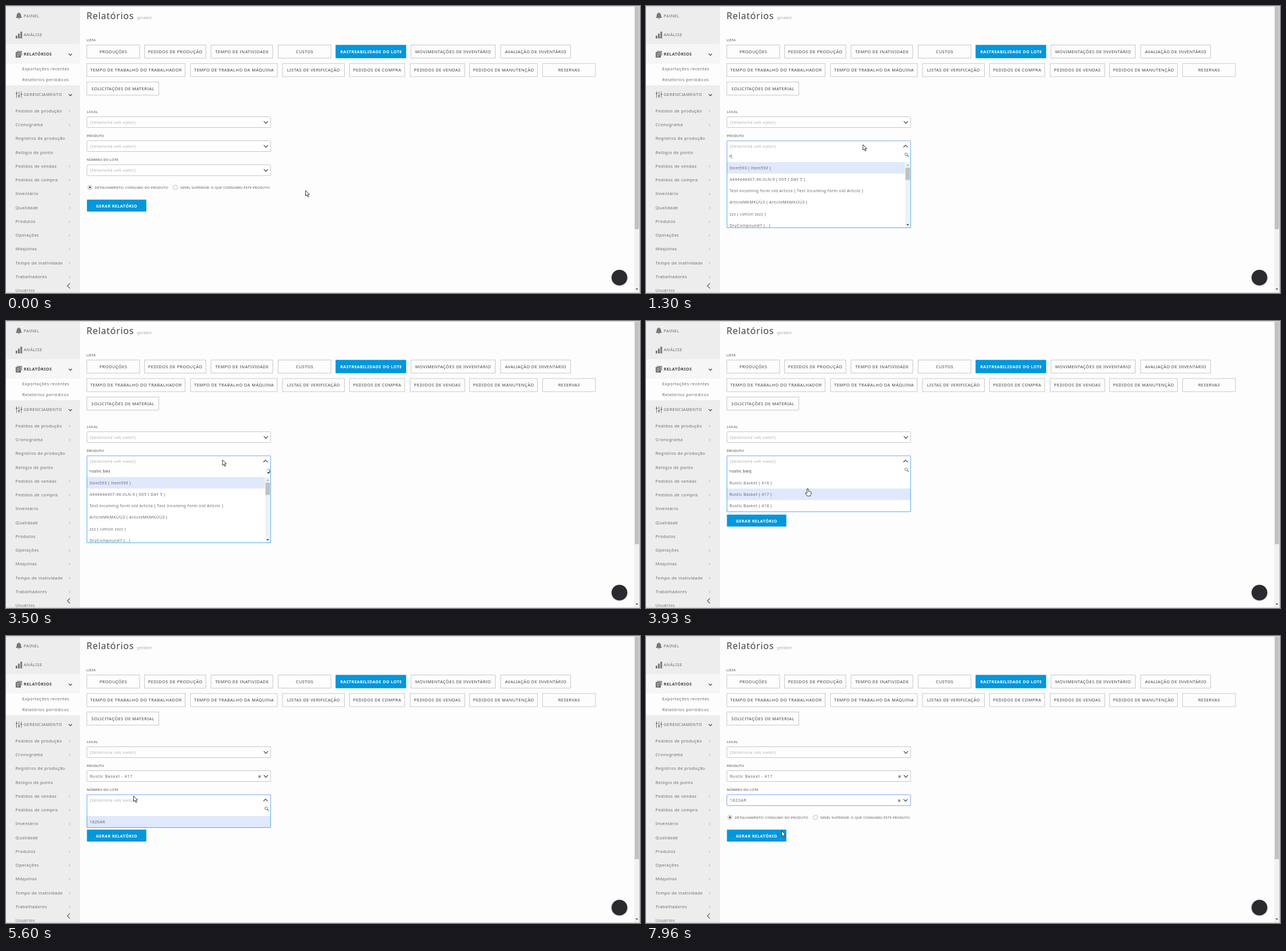
Animation of 1110 by 504 pixels, one loop 8 s. Source, as an HTML page:

```html
<!DOCTYPE html>
<html lang="pt">
<head>
<meta charset="utf-8">
<title>Relatórios</title>
<style>
html, body { margin: 0; width: 100%; height: 100%; overflow: hidden; background: #fdfdfd; }
svg { display: block; width: 100vw; height: 100vh; }
text { font-family: "Noto Sans", sans-serif; white-space: pre; }
.nav { font-size: 7.3px; letter-spacing: .46px; fill: #6a6a6a; }
.strong { font-weight: 700; fill: #444; }
.title { font-size: 16px; letter-spacing: .75px; fill: #444; }
.sub { font-size: 6.9px; letter-spacing: .15px; fill: #a8a8a8; }
.label { font-size: 6.1px; letter-spacing: .13px; fill: #444; }
.radio { font-size: 6.1px; letter-spacing: .14px; fill: #555; }
.button { font-size: 7.4px; letter-spacing: .5px; fill: #404040; text-anchor: middle; }
.primary { font-size: 7.1px; font-weight: 700; fill: #fff; }
.hint { font-size: 7.4px; letter-spacing: .53px; fill: #aaa; }
.value { font-size: 7.4px; letter-spacing: .53px; fill: #6a6a6a; }
.option { font-size: 7px; letter-spacing: .42px; fill: #666; }
.typed { font-size: 7.3px; letter-spacing: .4px; fill: #3a3a3a; }
.caret { fill: #222; }
</style>
</head>
<body>
<svg viewBox="0 0 1110 504" preserveAspectRatio="none">
  <g id="page"></g>
  <g id="live"></g>
</svg>
<script>
const LOOP = 8000;
const BLUE = '#0297db';
const HINT = '(Selecione um valor)';

const rect = (x, y, w, h, fill, more = '') =>
  `<rect x="${x}" y="${y}" width="${w}" height="${h}" fill="${fill}" ${more}/>`;
const line = (d, color, width = 1) =>
  `<path d="${d}" fill="none" stroke="${color}" stroke-width="${width}"/>`;
const shape = (d, fill) => `<path d="${d}" fill="${fill}"/>`;
// y is the middle of the capital letters
const text = (x, y, cls, str, drop = 2.7) =>
  `<text x="${x}" y="${y + drop}" class="${cls}">${str}</text>`;
const chevron = (x, y, w, h) =>
  line(`M${x - w} ${y - h}L${x} ${y + h}L${x + w} ${y - h}`, '#333', 1.1);

function sidebar() {
  const items = ['Pedidos de produção', 'Cronograma', 'Registros de produção', 'Relógio de ponto',
    'Pedidos de vendas', 'Pedidos de compra', 'Inventário', 'Qualidade', 'Produtos', 'Operações',
    'Máquinas', 'Tempo de inatividade', 'Trabalhadores', 'Usuários'];
  const leaves = [2, 3, 13];
  const gray = '#777';
  let s = rect(0, 0, 129.5, 504, '#ededed') + rect(0, 67, 129.5, 34, '#f6f6f6') +
    rect(0, 101, 129.5, 38, '#fdfdfd');
  s += shape('M17 21Q18.8 19 18.8 15.5Q19 12.7 21.6 12.2Q22.5 10.5 23.4 12.2Q26 12.7 26.2 15.5Q26.2 19 28 21ZM21 21.8H24Q22.5 24.2 21 21.8Z', gray);
  s += rect(17, 52, 2.8, 5, gray) + rect(21, 48.5, 3, 8.5, gray) + rect(25.2, 45, 3, 12, gray);
  s += shape('M19 79H28V87H27V80.2H19ZM17 81H26V90.5H17Z', '#666') +
    line('M18.5 83.5H24.5M18.5 85.8H24.5M18.5 88H22.5', '#eee', .8);
  s += line('M18.5 150V161.5M22.7 150V161.5M26.9 150V161.5', gray) +
    line('M17 153.5H20M21.2 158H24.2M25.4 155H28.4', gray, 1.8);
  s += text(31, 17, 'nav', 'PAINEL') + text(31, 50.5, 'nav', 'ANÁLISE') +
    text(31, 84, 'nav strong', 'RELATÓRIOS') + text(31, 155.5, 'nav', 'GERENCIAMENTO') +
    text(28.5, 110, 'nav', 'Exportações recentes') + text(28.5, 129, 'nav', 'Relatórios periódicos');
  s += chevron(112.7, 85.2, 2.8, 1.4) + chevron(112.7, 156.2, 2.8, 1.4);
  items.forEach((name, i) => {
    const y = 184 + 24.27 * i;
    s += text(16.8, y, 'nav', name);
    if (!leaves.includes(i)) s += line(`M110.3 ${y - 1.4}L112.2 ${y + .5}L110.3 ${y + 2.4}`, '#999', .8);
  });
  return s + line('M112 487L107.5 491.5L112 496', '#777', 1.5);
}

function reportButtons() {
  const rows = [
    [[141, 93.5, 'PRODUÇÕES'], [242, 108.5, 'PEDIDOS DE PRODUÇÃO'], [358.5, 109, 'TEMPO DE INATIVIDADE'],
      [476, 93.5, 'CUSTOS'], [577, 124, 'RASTREABILIDADE DO LOTE'],
      [708.5, 148.5, 'MOVIMENTAÇÕES DE INVENTÁRIO'], [865.5, 123.5, 'AVALIAÇÃO DE INVENTÁRIO']],
    [[141, 173, 'TEMPO DE TRABALHO DO TRABALHADOR'], [322.5, 153, 'TEMPO DE TRABALHO DA MÁQUINA'],
      [483.5, 109.5, 'LISTAS DE VERIFICAÇÃO'], [601, 97.5, 'PEDIDOS DE COMPRA'],
      [707, 96.5, 'PEDIDOS DE VENDAS'], [811, 120, 'PEDIDOS DE MANUTENÇÃO'], [939, 93.5, 'RESERVAS']],
    [[141, 127, 'SOLICITAÇÕES DE MATERIAL']]
  ];
  return rows.map((row, r) => row.map(([x, w, name]) => {
    const y = 68 + 32.5 * r, active = name.startsWith('RASTRE');
    const box = active ? rect(x, y + .3, w - .4, 23.4, BLUE)
      : rect(x + .5, y + .5, w - 1, 23, '#fdfdfd', 'stroke="#c8c8c8"');
    return box + text(x + w / 2 + .2, y + 12, active ? 'button primary' : 'button', name);
  }).join('')).join('');
}

function page() {
  return sidebar() +
    text(141, 17.5, 'title', 'Relatórios', 5.8) + text(229, 20.3, 'sub', 'gerador') +
    text(141, 59.5, 'label', 'LISTA', 2.2) + reportButtons() +
    ['LOCAL', 'PRODUTO', 'NÚMERO DO LOTE'].map((s, i) => text(141.5, 185.5 + 42.2 * i, 'label', s, 2.2)).join('') +
    [147, 296.5].map(x => `<circle cx="${x}" cy="318.5" r="3.9" fill="#fff" stroke="#aaa" stroke-width=".8"/>`).join('') +
    '<circle cx="147" cy="318.5" r="1.9" fill="#666"/>' +
    text(155.5, 318.5, 'radio', 'DETALHAMENTO: CONSUMO DO PRODUTO', 2.2) +
    text(305.5, 318.5, 'radio', 'NÍVEL SUPERIOR: O QUE CONSUMIU ESTE PRODUTO', 2.2) +
    rect(141.7, 340, 104, 21, BLUE, 'rx="1"') + text(193.7, 351, 'button primary', 'GERAR RELATÓRIO') +
    rect(1100, 0, 10, 504, '#f1f1f1') + rect(1100.7, 0, 7.6, 392, '#c1c1c1') +
    shape('M1102.3 496H1106.7L1104.5 498.7Z', '#505050') + rect(1109, 0, 1, 504, '#b4b4b4') +
    rect(0, 0, 1110, 1.5, '#d6d6d6') + rect(0, 502.7, 1110, 1.3, '#d6d6d6') +
    '<circle cx="1074" cy="478" r="15" fill="#000" opacity=".08"/>' +
    '<circle cx="1074" cy="477" r="13.8" fill="#292b2f"/>';
}

function select(y, value, focused) {
  const dx = focused ? -.6 : 0;
  let s = rect(141.7, y + .5, 321.6, 19, '#fff', `rx="1.5" stroke="${focused ? '#7aa2f0' : '#c6c6c6'}"`) +
    text(146.7, y + 10, value ? 'value' : 'hint', value || HINT) + chevron(455 + dx, y + 10.2, 3.6, 1.9);
  if (value) s += line(`M${442 + dx} ${y + 8.8}l4 4m0 -4l-4 4`, '#666', 1.2);
  return s;
}

const magnifier = y => `<circle cx="455.4" cy="${y}" r="2.3" fill="none" stroke="#666" stroke-width=".9"/>` +
  line(`M457.1 ${y + 1.7}L459.8 ${y + 4.3}`, '#666', 1.3);

function spinner(y, t) {
  const step = Math.floor(t / 100);
  let s = '';
  for (let i = 0; i < 8; i++) {
    const a = (i + step) * Math.PI / 4;
    s += `<circle cx="${458.8 + 3.2 * Math.cos(a)}" cy="${y + 3.2 * Math.sin(a)}" r="1.2" fill="#222" opacity="${((i + 1) / 8) ** 2}"/>`;
  }
  return s;
}

// o: top, bottom, searchY, iconY, listY, options, picked, scroll, text, keys, opened, busy
function dropdown(o, t) {
  const pressed = o.keys.filter(k => k <= t);
  const since = t - (pressed.at(-1) ?? o.opened);
  const caret = since % 1060 < 530 ? '<tspan class="caret" dx="-1.6">|</tspan>' : '';
  let s = rect(141, o.top, 323, o.bottom - o.top, '#fff') +
    text(146.7, o.top + 10, 'hint', HINT) +
    line(`M450.8 ${o.top + 12}L454.4 ${o.top + 8.2}L458 ${o.top + 12}`, '#333', 1.1) +
    text(146, o.searchY, 'typed', o.text.slice(0, pressed.length) + caret);
  s += o.busy ? spinner(o.searchY, t) : magnifier(o.iconY);
  s += rect(142, o.listY + 20.2 * o.picked, o.scroll ? 311.5 : 321, 20.2, '#e0e8fc');
  o.options.forEach((name, i) => s += text(146.3, o.listY + 10 + 20.2 * i, 'option', name));
  if (o.scroll) s += rect(453.7, 274.5, 9, 114.5, '#f1f1f1') + rect(454.3, 284, 7.8, 21.5, '#c1c1c1') +
    shape('M456 280.5H460.5L458.2 278Z', '#a0a0a0') + shape('M456 383H460.5L458.2 385.7Z', '#444');
  const left = 141.8, right = 463.3, top = o.top + .8, bottom = o.bottom - .6, shoulder = o.top + 18;
  return s + line(`M${left} ${shoulder}V${bottom}H${right}V${shoulder}`, '#4fabdf') +
    line(`M${left} ${shoulder}V${top}H${right}V${shoulder}`, '#7aa2f0');
}

const twice = s => `${s} ( ${s} )`;
const allProducts = [twice('Item593'), '4444444407-6K.VLN-9 ( 005 I DAY 5 )',
  twice('Test incoming form old Article'), twice('ArticleMKMKÜÜ3'), 'zzz ( cotton zzzz )', 'DryCompound7 ( . )'];
const foundProducts = [416, 417, 418].map(n => `Rustic Basket ( ${n} )`);

function productList(t) {
  const found = t >= 3600;
  return dropdown({
    top: 236, bottom: found ? 335.5 : 390, searchY: 263.5, iconY: 260.4, listY: 274,
    options: found ? foundProducts : allProducts, picked: t >= 3860 ? 1 : 0, scroll: !found,
    text: 'rustic bas', keys: [1280, 1500, 1560, 1610, 1660, 1700, 2330, 2390, 2450, 2510],
    opened: 700, busy: t >= 1560 && !found
  }, t);
}

const lotList = t => dropdown({
  top: 278, bottom: 337, searchY: 305.8, iconY: 302.4, listY: 316.2,
  options: ['1820AR'], picked: 0, text: '1820', keys: [5750, 5900, 6060, 6350],
  opened: 5000, busy: t >= 5900 && t < 6560
}, t);

const path = [[30, 524.5, 324], [490, 376.8, 244.5], [560, 379.8, 243.5], [3470, 379.8, 243.5],
  [4130, 256, 308], [4460, 256, 308], [4830, 223.5, 281], [6670, 223.5, 281],
  [6960, 253.5, 330], [7170, 255, 341], [7430, 258, 328], [7870, 258, 328], [7960, 237.5, 342.3]];

function pointer(t) {
  let i = path.findIndex(p => p[0] > t);
  if (i < 0) i = path.length;
  const a = path[Math.max(i - 1, 0)], b = path[Math.min(i, path.length - 1)];
  const u = b[0] > a[0] ? (t - a[0]) / (b[0] - a[0]) : 0, e = u * u * (3 - 2 * u);
  const x = a[1] + (b[1] - a[1]) * e, y = a[2] + (b[2] - a[2]) * e;
  const hand = t > 3780 && t < 4520 || t > 6780 && t < 7920;
  const d = hand
    ? 'M-1.1 .8Q0 -.6 1.1 .8V5Q2.2 4.2 3 5.3Q4.2 4.7 4.8 5.9Q6 5.6 6 7V10Q5.8 11.5 4.8 13.3H-.8Q-2.5 11 -4 8.6Q-4 7 -2.6 7.6L-1.1 9Z'
    : 'M0 0V9.6L2.2 7.5L3.8 11.2L5.5 10.5L3.9 6.9H7Z';
  return `<path transform="translate(${x} ${y})" d="${d}" fill="#fff" stroke="#222" stroke-width=".9"/>`;
}

function live(t) {
  const product = t >= 4460 ? 'Rustic Basket - 417' : '';
  const lot = t >= 7700 ? '1820AR' : '';
  let s = select(194, '') + select(236, product, product && t < 5000) + select(278.3, lot, !!lot);
  if (t >= 700 && t < 4460) s += productList(t);
  if (t >= 5000 && t < 7700) s += lotList(t);
  return s + pointer(t);
}

const liveLayer = document.getElementById('live');
document.getElementById('page').innerHTML = page();
const start = performance.now();
function frame() {
  liveLayer.innerHTML = live((performance.now() - start) % LOOP);
  requestAnimationFrame(frame);
}
frame();
</script>
</body>
</html>
```
